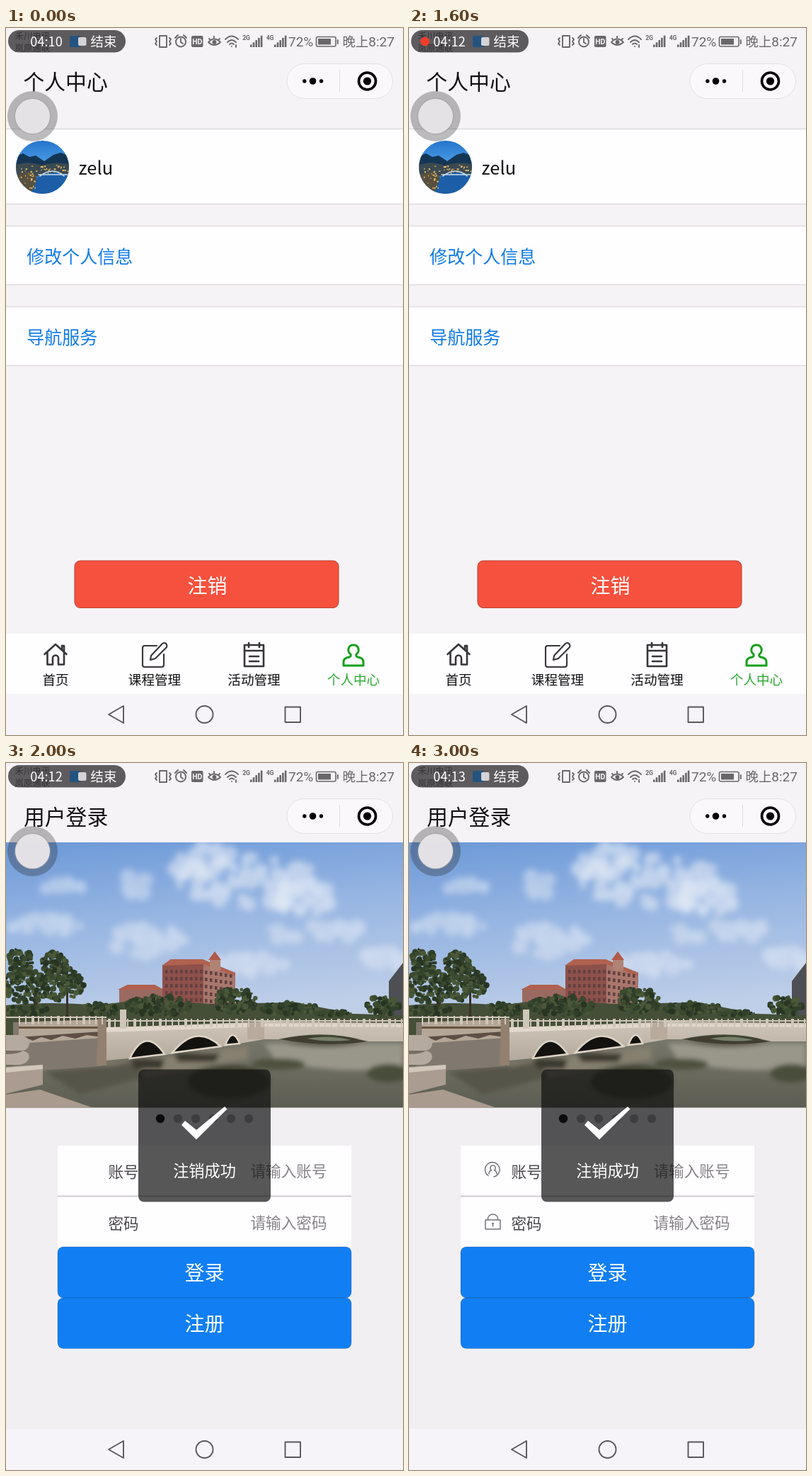
An HTML page that plays this animation: 561x998 px, repeating every 3400 ms.

```html
<!DOCTYPE html>
<html lang="zh-CN">
<head>
<meta charset="utf-8">
<title>个人中心</title>
<style>
  html, body { margin: 0; width: 100%; height: 100%; overflow: hidden; background: #f6f4f8; }
  svg { display: block; }
  text { font-family: "Noto Sans CJK SC", "Noto Sans CJK", "Noto Sans CJK JP", sans-serif; }
  .num { font-family: Roboto, "Noto Sans", sans-serif; }
  .mid { text-anchor: middle; }
  .line { fill: none; stroke-linecap: round; stroke-linejoin: round; }
  .timed { animation: 3400ms step-end infinite; }
  .profile { animation-name: profile; }
  .signin, .toast { animation-name: signin; }
  .loaded { animation-name: loaded; }
  .fieldIcons { animation-name: fieldIcons; }
  .press { animation-name: press; }
  .label { animation-name: label; }
  .rec { animation-name: rec; }
  .clock { animation-name: clock; }
  @keyframes profile { 0% { opacity: 1 } 55.88%, 100% { opacity: 0 } }
  @keyframes signin { 0% { opacity: 0 } 55.88%, 100% { opacity: 1 } }
  @keyframes loaded { 0% { opacity: 0 } 58.82%, 100% { opacity: 1 } }
  @keyframes fieldIcons { 0% { opacity: 0 } 61.76%, 100% { opacity: 1 } }
  @keyframes press { 0% { fill: #f6513e } 52.94%, 100% { fill: #da4837 } }
  @keyframes label { 0% { fill-opacity: 1 } 52.94%, 100% { fill-opacity: .6 } }
  @keyframes rec {
    0%, 23.52%, 55.88%, 85.29%, 100% { opacity: 0 }
    11.76%, 41.17%, 67.64% { opacity: 1 }
  }
  @keyframes clock {
    0% { transform: translateY(0) }
    14.7% { transform: translateY(-30px) }
    44.11% { transform: translateY(-60px) }
    73.52%, 100% { transform: translateY(-90px) }
  }
</style>
</head>
<body>
<svg width="561" height="998" viewBox="0 0 561 998">
  <defs>
    <linearGradient id="sky" x2=".2" y2="1">
      <stop offset="0" stop-color="#6c99d8"/><stop offset=".45" stop-color="#96b5e2"/><stop offset="1" stop-color="#bfcfe8"/>
    </linearGradient>
    <linearGradient id="water" x2="0" y2="1">
      <stop offset="0" stop-color="#77766a"/><stop offset=".5" stop-color="#6a6a5e"/><stop offset="1" stop-color="#5c5d53"/>
    </linearGradient>
    <linearGradient id="stone" x2="0" y2="1">
      <stop offset="0" stop-color="#cfc6ba"/><stop offset="1" stop-color="#b3a99c"/>
    </linearGradient>
    <linearGradient id="dusk" x2="0" y2="1">
      <stop offset="0" stop-color="#2474cc"/><stop offset=".4" stop-color="#4a9ae6"/><stop offset="1" stop-color="#174a80"/>
    </linearGradient>
    <filter id="soft" x="-30%" y="-50%" width="160%" height="200%"><feGaussianBlur stdDeviation="5"/></filter>
    <filter id="blur" x="-30%" y="-50%" width="160%" height="200%"><feGaussianBlur stdDeviation="3"/></filter>
    <clipPath id="photoClip"><path d="M0 112H561V486.500H0Z"/></clipPath>
    <clipPath id="faceClip"><circle cx="51.5" cy="196.5" r="37.5"/></clipPath>
  </defs>

  <rect width="561" height="998" fill="#f6f3f7"/>

  <g class="timed profile">
    <text x="24.5" y="87" font-size="29.8" fill="#111">个人中心</text>
    <g fill="#fefdff" stroke="#dfdce1" stroke-width="1.5">
      <rect x="-3" y="142.5" width="567" height="106"/>
      <rect x="-3" y="279.5" width="567" height="83"/>
      <rect x="-3" y="393.5" width="567" height="83"/>
    </g>
    <g clip-path="url(#faceClip)">
      <rect x="14" y="159" width="75" height="75" fill="url(#dusk)"/>
      <path d="M14 181l10-4 9 5 9-2 12 8 13-9 10-3 12 4v17H14Z" fill="#153554"/>
      <path d="M14 193q18-6 36 1 18-6 39-2v17H14Z" fill="#3b4a52"/>
      <path d="M89 207q-36-9-48 9-9 9-8 18h56Z" fill="#1c5fa8"/>
      <path d="M14 207l18-4 12 8-8 22H14Z" fill="#57503f"/>
      <g id="lights" fill="#edba62"/>
      <path class="line" d="M48 209q18-14 34 0M46 207h42" stroke="#c9def0" stroke-width="1.6"/>
    </g>
    <text x="102.5" y="207" font-size="25.5" fill="#111">zelu</text>
    <g font-size="25" fill="#0f7be6">
      <text x="29.3" y="332.3">修改个人信息</text>
      <text x="29.3" y="446.3">导航服务</text>
    </g>
    <rect class="timed press" x="97" y="752" width="373" height="66.5" rx="8" stroke="#b5402f" fill="#f6513e"/>
    <text class="mid timed label" x="284.5" y="798" font-size="28" fill="#fff">注销</text>

    <rect y="855" width="561" height="85" fill="#fefdff"/>
    <g class="line" stroke="#37343b" stroke-width="2.6">
      <path d="M54.5 884L70 870l15.500 14M58.500 882v16.500h7.500v-9a4 4 0 0 1 8 0v9h8V882M79 877v-5h3v8"/>
      <path d="M213 872h-17a3 3 0 0 0-3 3v24a3 3 0 0 0 3 3h24a3 3 0 0 0 3-3v-15M205 886l16-17q3-2 5 0t1 5l-16 16-7 2Z" stroke-width="2.1"/>
      <path d="M337 871h27v30h-27ZM337 879h27M343 868v6M358 868v6M344 887h13M344 894h13"/>
      <path d="M491 871a6.500 7 0 0 1 4 13q-1 3 2 4 8 1 8 7v5h-28v-5q0-6 8-7 3-1 2-4a6.500 7 0 0 1 4-13Z" stroke="#14a01a" stroke-width="3"/>
    </g>
    <g class="mid" font-size="18.600" fill="#111">
      <text x="70" y="927">首页</text>
      <text x="210" y="927">课程管理</text>
      <text x="350.500" y="927">活动管理</text>
      <text x="491" y="927" fill="#27aa2d">个人中心</text>
    </g>
  </g>

  <g class="timed signin">
    <rect y="40" width="561" height="72" fill="#f6f3f7"/>
    <rect y="112" width="561" height="830" fill="#fdfcfe"/>
    <text x="25" y="87" font-size="29.8" fill="#111">用户登录</text>
    <g class="timed loaded">
      <rect y="112" width="561" height="830" fill="#f2eff3"/>
      <g clip-path="url(#photoClip)">
        <rect y="112" width="561" height="260" fill="url(#sky)"/>
        <g id="clouds" fill="#edf1f8"/>
        <path d="M541 308l20-26v78h-20Z" fill="#4d4f54"/>
        <path d="M160 319l12-6h38l11 6v20h-61Z" fill="#9a6a61"/>
        <path d="M158 320l14-7h38l12 7Z" fill="#b0604f"/>
        <path d="M221 286l58-8 45 18v52H221Z" fill="#8d504a"/>
        <path d="M279 278l45 18v52h-45Z" fill="#a8776c"/>
        <path d="M220 286l13-9h45l46 20v4l-45-17Z" fill="#b1614f"/>
        <path d="M288 277h15v16h-15Z" fill="#b08374"/><path d="M286 278l9-12 9 12Z" fill="#b05a48"/>
        <g id="windows" fill="#61403f"/>
        <path d="M0 342q60-6 130 0l60-8 100 6 120-2 80 16 71 2v40H0Z" fill="#454f37"/>
        <path d="M39 318h5l2 44h-7Z" fill="#393128"/>
        <path d="M85 325h3v37h-3Z" fill="#393128"/>
        <g id="trees"/>
        <rect y="390" width="561" height="97" fill="url(#water)"/>
        <g filter="url(#blur)">
          <path d="M365 396h196v32q-90 14-180-8Z" fill="#99968a"/>
          <path d="M142 424l90-10 110-14v18l-80 14-120 22Z" fill="#868070"/>
          <path d="M55 436l90-8 40-8 10 24-90 24Z" fill="#57554a"/>
          <path d="M176 418h48l-4 14h-38ZM236 410h66l-6 12h-52Z" fill="#3a392f"/>
          <ellipse cx="315" cy="450" rx="58" ry="24" fill="#3f4234"/>
          <ellipse cx="385" cy="425" rx="38" ry="8" fill="#505141"/>
          <ellipse cx="540" cy="438" rx="30" ry="13" fill="#4a4d3b"/>
          <path d="M386 394h126q-60 14-126 0Z" fill="#55533f"/>
        </g>
        <path d="M10 366l125-4v66l-100 7-25-5Z" fill="#81796f"/>
        <path d="M18 366l117-4v26l-117 8Z" fill="#b4a797"/>
        <path d="M18 394l10-6 10 4 12-5 14 4 16-6 18 4 16-5 21 3v-8l-117 8Z" fill="#5e4e43"/>
        <path d="M18 372h117v3H18Z" fill="#66543f"/>
        <path d="M142 374l198-8 25-1 196 2v26h-49q-62-18-127-3h-20l-70 12-70 10-83 8Z" fill="url(#stone)"/>
        <path d="M142 373l198-5 221 1v4l-196-1-223 8Z" fill="#e2d9cc"/>
        <path d="M388 390q62-12 122 3-60 9-122-3Z" fill="#403e31"/>
        <path d="M425 389q30-6 62 2-30 4-62-2Z" fill="#77806a"/>
        <g fill="#14120f" stroke="#ded5c7" stroke-width="2.500">
          <path d="M175 417q22-46 49-6Z"/><path d="M235 409q34-42 68-9Z"/><path d="M310 398q10-27 20-2Z"/>
        </g>
        <path d="M130 361h12v66h-14Z" fill="#93806f"/><path d="M341 366h24v24h-24Z" fill="#b8ab9c"/>
        <g id="rails" fill="#cfc6ba"/>
        <path d="M0 384h19q15 3 14 12t-10 10q12 2 9 12-4 8-16 8H0Z" fill="#b5aaa0"/>
        <path d="M0 406h24q-6 5-24 5Z" fill="#776e65"/>
        <path d="M0 429l52-3v28L0 467Z" fill="#aa9c90"/>
        <path d="M0 430l52-4v6L0 437Z" fill="#d2c7bb"/>
        <path d="M0 468l48-7 76 26H0Z" fill="#a99b8d"/>
      </g>
      <g id="pager"/>
      <rect x="73" y="540" width="415" height="144" fill="#fefdff"/>
      <path d="M73 611.500h415" stroke="#cfccd1" stroke-width="2"/>
      <g font-size="21.600" fill="#48464a">
        <text x="144.500" y="585">账号</text><text x="144.500" y="658">密码</text>
        <g fill="#858287"><text x="345.500" y="583.500">请输入账号</text><text x="345.500" y="656.500">请输入密码</text></g>
      </g>
      <g class="line timed fieldIcons" stroke="#757277" stroke-width="1.500">
        <path d="M112 582.500a10.300 10.300 0 1 1 8 1.500M113 580q0-4 3.500-5a3.600 4 0 1 1 4 0q3.500 1 3.500 5"/>
        <path d="M108 645h21v13h-21ZM111.500 645v-2a7 6 0 0 1 14 0v2M118.500 649.500v4.500M117.500 650h2"/>
      </g>
      <g fill="#117ff3" stroke="#000" stroke-opacity=".2" stroke-width=".8">
        <rect x="73" y="683" width="415" height="72" rx="8"/><rect x="73" y="755" width="415" height="71.500" rx="8"/>
      </g>
      <g class="mid" font-size="28" fill="#fff"><text x="280.500" y="730">登录</text><text x="280.500" y="802">注册</text></g>
    </g>
  </g>

  <g class="timed toast">
    <rect x="187" y="432.500" width="187" height="187" rx="8" fill="#111" fill-opacity=".7"/>
    <path d="M248 511l5-6 16 13 40-33 3.500 3.500L269 531.500Z" fill="#fff"/>
    <text class="mid" x="280.500" y="584" font-size="22.200" fill="#fff">注销成功</text>
  </g>

  <rect x="397" y="50.500" width="149.500" height="49" rx="24.500" fill="#faf8fb" stroke="#e3e0e5"/>
  <path d="M471.500 59v31" stroke="#dfdce1"/>
  <circle cx="421.800" cy="75" r="2.700"/><circle cx="433.500" cy="75" r="4.800"/><circle cx="445.500" cy="75" r="2.700"/>
  <circle cx="510.500" cy="75" r="5.600"/><circle cx="510.500" cy="75" r="12" fill="none" stroke="#000" stroke-width="3.600"/>

  <circle cx="37.500" cy="124.500" r="35.500" fill="#222" fill-opacity=".3"/>
  <circle cx="37.500" cy="124.500" r="26" fill="#999" fill-opacity=".45"/>
  <circle cx="37.500" cy="124.500" r="24.500" fill="#e8e4e8" fill-opacity=".96"/>

  <rect x="3" y="3" width="166" height="31.500" rx="15.700" fill="#5d5b5e"/>
  <g font-size="12.400" fill="#353336"><text x="12.500" y="15.500">禾川电讯</text><text x="12.500" y="32.500">岚原通联</text></g>
  <rect x="90" y="11" width="16" height="16" rx="2" fill="#23547f"/>
  <rect x="102" y="13" width="11.500" height="12" rx="2" fill="#d5d3d6"/>
  <circle class="timed rec" cx="22.500" cy="19" r="6.300" fill="#f43d2b"/>
  <svg x="34" y="4" width="50" height="30">
    <g class="timed clock num" font-size="18.200" fill="#fff">
      <text x=".3" y="22">04:10</text><text x=".3" y="52">04:11</text><text x=".3" y="82">04:12</text><text x=".3" y="112">04:13</text>
    </g>
  </svg>
  <text x="119.500" y="25.800" font-size="18.400" fill="#fff">结束</text>

  <g class="line" stroke="#69676a" stroke-width="1.900">
    <path d="M217 11h10v16h-10ZM213 14l-2 2 2 3-2 3 2 2M231 14l2 2-2 3 2 3-2 2"/>
    <circle cx="247" cy="19.500" r="7"/><path d="M247 15v5l3 2M239 14l4-4M255 14l-4-4"/>
    <path d="M286 20q8-9 17 0-9 8-17 0ZM287 15l2 2M294 12v2M302 15l-2 2"/>
    <path d="M310 16q9-9 18 0M313 20q6-6 12 0M316 23q3-3 6 0M319 26h.1M325 24v3"/>
    <rect x="438.500" y="12.500" width="27.500" height="13.500" rx="2" stroke-width="1.600"/><path d="M468.800 17v5"/>
  </g>
  <g fill="#69676a">
    <circle cx="294.500" cy="20" r="3"/>
    <rect x="441" y="15" width="18" height="8.500"/>
    <rect x="262" y="11" width="16.500" height="16" rx="2"/>
    <text class="mid num" x="270.300" y="22.800" font-size="10.500" font-weight="700" fill="#f6f3f7">HD</text>
    <g font-size="8.600" font-weight="700"><text class="num" x="334.200" y="17">2G</text><text class="num" x="367.700" y="17">4G</text></g>
    <g id="signal"/>
    <text class="num" x="399" y="26" font-size="19">72%</text>
    <text x="475.500" y="25.800" font-size="18.400">晚上</text><text class="num" x="512.300" y="26" font-size="19">8:27</text>
  </g>

  <rect y="940" width="561" height="58" fill="#f6f4f8"/>
  <g class="line" stroke="#59575a" stroke-width="1.900">
    <path d="M145 969l21-12v24Z"/><circle cx="280.500" cy="969" r="12"/><path d="M394.500 958.500h21.500v21.500h-21.500Z"/>
  </g>
</svg>
<script>
  const add = (parent, tag, attrs) => {
    const node = document.createElementNS("http://www.w3.org/2000/svg", tag);
    for (const key in attrs) node.setAttribute(key, attrs[key]);
    parent.append(node);
    return node;
  };
  const byId = id => document.getElementById(id);
  const box = (id, x, y, width, height) => add(byId(id), "rect", { x, y, width, height });
  let seed = 7;
  const rand = () => (seed = seed * 16807 % 2147483647) / 2147483647;

  // Fills an ellipse with randomly placed circles.
  function scatter(parent, [cx, cy, rx, ry], count, size, shades) {
    for (let i = 0; i < count; i++) {
      const angle = rand() * 2 * Math.PI, reach = Math.sqrt(rand());
      add(parent, "circle", {
        cx: cx + Math.cos(angle) * reach * rx, cy: cy + Math.sin(angle) * reach * ry,
        r: size * (.5 + rand()), fill: shades[i % shades.length]
      });
    }
  }

  const leaves = ["#303f29", "#3b4a2f", "#4a5838", "#283523"];
  [[20, 282, 18, 22], [28, 315, 32, 24], [68, 284, 18, 20], [76, 312, 34, 24], [30, 349, 34, 7], [133, 348, 30, 8],
   [216, 343, 46, 15], [323, 336, 32, 18], [400, 347, 40, 9], [465, 353, 28, 3], [533, 343, 24, 14]]
    .forEach(crown => scatter(byId("trees"), crown, 20 + crown[2] * crown[3] / 6, 3, leaves));

  [[345, 168, 112, 34], [425, 190, 46, 22], [280, 142, 46, 22], [200, 250, 64, 20], [435, 238, 72, 12],
   [60, 228, 55, 12], [335, 283, 60, 12], [185, 172, 22, 14], [75, 175, 35, 4], [538, 275, 30, 12]]
    .forEach((cloud, i) => {
      const puffs = add(byId("clouds"), "g", { filter: "url(#soft)", opacity: i < 3 ? .62 : .5 });
      scatter(puffs, cloud, 14 + cloud[2] * cloud[3] / 70, 8, ["#eaf0f8", "#e0e7f3"]);
    });

  for (let row = 0; row < 5; row++)
    for (let col = 0; col < 14; col++)
      box("windows", 225 + col * 7, 292 + row * 10 + Math.max(0, col - 7), 3.5, 5);

  for (let x = 18; x < 561; x += 9) {
    box("rails", x, x < 140 ? 357 : 361, x % 4 ? 2 : 4, 12);
  }
  box("rails", 0, 358, 142, 2);
  box("rails", 142, 363, 419, 2);
  box("rails", 161, 348, 9, 27);

  for (let i = 0; i < 6; i++)
    add(byId("pager"), "circle", { cx: 218 + i * 25, cy: 502, r: 6.2, "fill-opacity": i ? .3 : 1 });

  for (const left of [345, 379])
    for (let i = 0; i < 5; i++) box("signal", left + i * 3.7, 23.5 - i * 3.2, 2.6, 3.5 + i * 3.2);

  for (let i = 0; i < 55; i++) {
    const x = 15 + rand() * 72;
    box("lights", x, x < 42 ? 194 + rand() * 32 : 193 + rand() * 12, 1 + rand() * 2, 1 + rand() * 1.5);
  }
</script>
</body>
</html>
```
